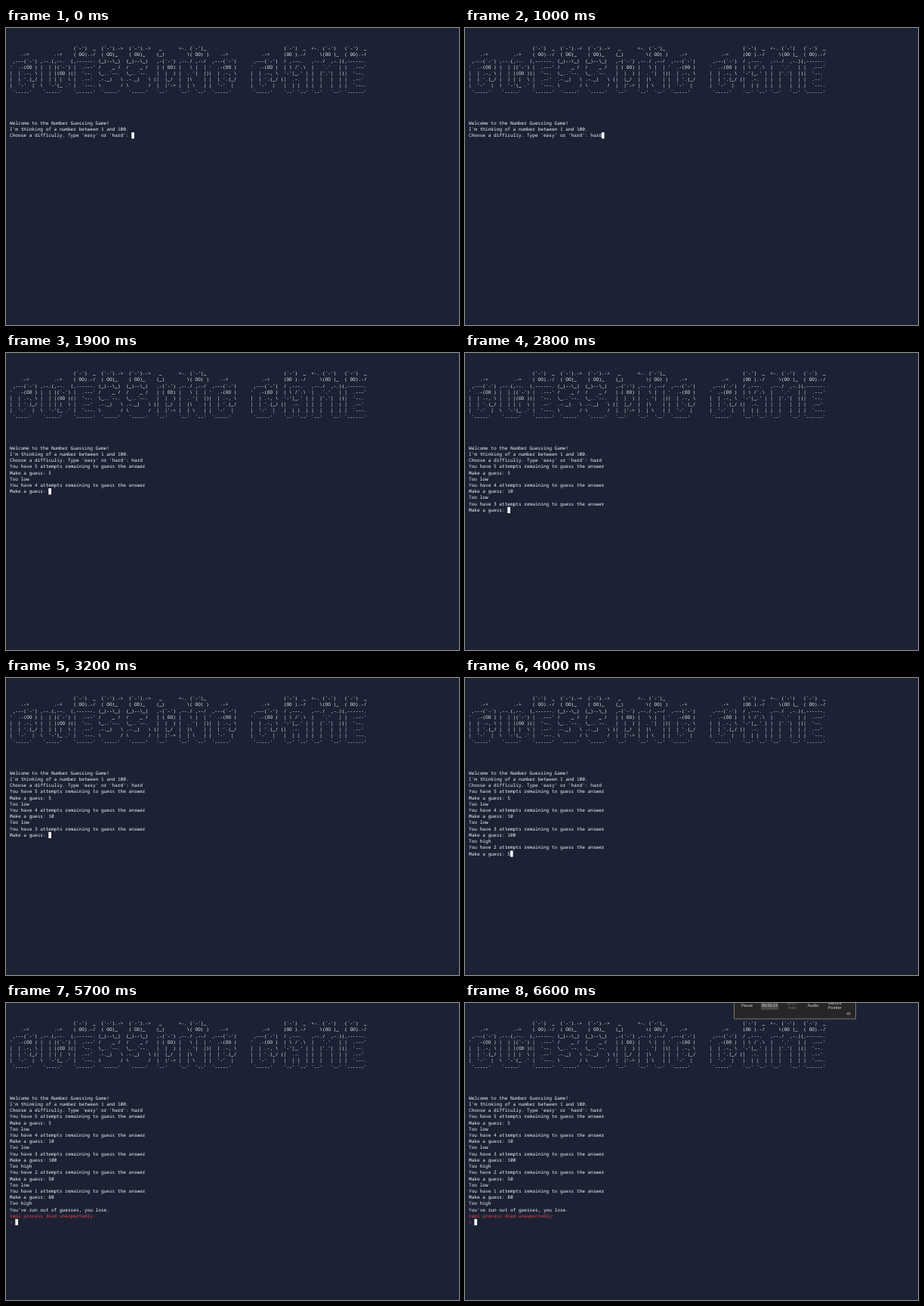
An HTML page that plays this animation: 600x393 px, repeating every 6700 ms.

```html
<!DOCTYPE html>
<html lang="en">
<head>
<meta charset="utf-8">
<title>Guessing game in a terminal</title>
<style>
  html, body { margin: 0; width: 100%; height: 100%; overflow: hidden; background: #1c2133; }
  /* 20px type has a 12px advance; the scale brings a cell to 3.664 x 8.213 px */
  #terminal {
    position: absolute; left: 5.3px; top: 22.9px; margin: 0;
    font: 500 20px/26.9px "Noto Sans Mono", "DejaVu Sans Mono", monospace;
    font-variant-ligatures: none; text-rendering: geometricPrecision;
    color: #f5f9fc; transform: scale(.30533); transform-origin: 0 0;
  }
  #error { color: #e5484f; }
  #prompt { color: #a23a48; }
  #cursor { display: inline-block; width: 12px; height: 26.9px; vertical-align: top; background: #f5f9fc; }
  #recorder { position: absolute; left: 0; top: 0; }
  #recorder text { font: 5.3px "Open Sans", sans-serif; text-anchor: middle; fill: #eee; text-rendering: geometricPrecision; }
  #recorder .dim { fill: #777; }
</style>
</head>
<body>
<pre id="terminal"><span id="output"></span><span id="error"></span><span id="prompt"></span><span id="cursor"></span></pre>

<svg id="recorder" width="600" height="393">
  <g id="panel">
    <rect x="356.5" y="-40" width="161" height="61" fill="#262626" stroke="#777"/>
    <rect x="392" y="-20" width="23" height="29" fill="#484848"/>
    <text x="373.5" y="5">Pause</text>
    <text x="403.5" y="5">00:00:23</text>
    <text x="433" y="2" class="dim">Select</text>
    <text x="433" y="8" class="dim">Area</text>
    <text x="461" y="5">Audio</text>
    <text x="490" y="2">Record</text>
    <text x="490" y="8">Pointer</text>
    <path d="M505 14h2m0-1.5v3m0-2.5h3v2h-3" fill="none" stroke="#aaa" stroke-width=".7"/>
  </g>
</svg>

<script type="text/plain" id="glyphs">
G11
=
    .->
 ,---(`-')
'  .-(OO )
|  | .-, \
|  | '.(_/
|  '-'  |
 `-----'
U11
=
     .->
,--.(,--.
|  | |(`-')
|  | |(OO )
|  | | |  \
\  '-'(_ .'
 `-----'
E10
 (`-')  _
 ( OO).-/
(,------.
 |  .---'
(|  '--.
 |  .--'
 |  `---.
 `------'
S10
 (`-').->
 ( OO)_
(_)--\_)
/    _ /
\_..`--.
.-._)   \
\       /
 `-----'
I9
  _
 (_)
 ,-(`-')
 | ( OO)
 |  |  )
(|  |_/
 |  |'->
 `--'
N11
<-. (`-')_
   \( OO) )
,--./ ,--/
|   \ |  |
|  . '|  |)
|  |\    |
|  | \   |
`--'  `--'
A11
 (`-')  _
 (OO ).-/
 / ,---.
 | \ /`.\
 '-'|_.' |
(|  .-.  |
 |  | |  |
 `--' `--'
M11
<-. (`-')
   \(OO )_
,--./  ,-.)
|   `.'   |
|  |'.'|  |
|  |   |  |
|  |   |  |
`--'   `--'
</script>
<script>
const $ = id => document.getElementById(id);
const LOOP = 6700, ROWS = 8;

// Each glyph is a header (letter and width) and eight rows; "=" marks an empty row.
const glyphs = { ' ': { width: 4, rows: [] } };
const source = $('glyphs').textContent.split('\n').slice(1, -1);
for (let i = 0; i < source.length; i += ROWS + 1) {
  glyphs[source[i][0]] = {
    width: +source[i].slice(1),
    rows: source.slice(i + 1, i + 1 + ROWS).map(row => row === '=' ? '' : row)
  };
}
const banner = Array.from({ length: ROWS }, (_, row) =>
  [...'GUESSING GAME'].map(c => (glyphs[c].rows[row] || '').padEnd(glyphs[c].width)).join('')
).join('\n');

const ask = left => `You have ${left} attempts remaining to guess the answer\nMake a guess: `;
const reply = (verdict, left) => `\nToo ${verdict}\n${ask(left)}`;

const output = [
  [0, banner + '\n\n\n\n\nWelcome to the Number Guessing Game!\n' +
      "I'm thinking of a number between 1 and 100.\n" +
      "Choose a difficuliy. Type 'easy' or 'hard': "],
  [200, 'h'], [300, 'a'], [400, 'r'], [500, 'd'], [1100, '\n' + ask(5)],
  [1600, '5'], [1800, reply('low', 4)],
  [2000, '1'], [2100, '0'], [2800, reply('low', 3)],
  [3300, '1'], [3400, '0'], [3500, '0'], [3600, reply('high', 2)],
  [4000, '5'], [4100, '0'], [4200, reply('low', 1)],
  [4700, '8'], [4800, '0'], [4900, "\nToo high\nYou've run out of guesses, you lose.\n"]
];

function draw(t) {
  $('output').textContent = output.filter(([at]) => at <= t).map(([, text]) => text).join('');
  const died = t >= 5000;
  $('error').textContent = died ? 'repl process died unexpectedly:\n' : '';
  $('prompt').textContent = died ? '❯ ' : '';

  // The recorder panel drops in from the top edge in 100 ms steps.
  const step = Math.floor((t - 6300) / 100);
  $('panel').style.display = step > 0 ? '' : 'none';
  $('panel').setAttribute('transform', `translate(0 ${Math.min(0, (step - 3) * 8)})`);
}

const start = performance.now();
function tick() {
  draw((performance.now() - start) % LOOP);
  requestAnimationFrame(tick);
}
draw(0);
requestAnimationFrame(tick);
</script>
</body>
</html>
```
